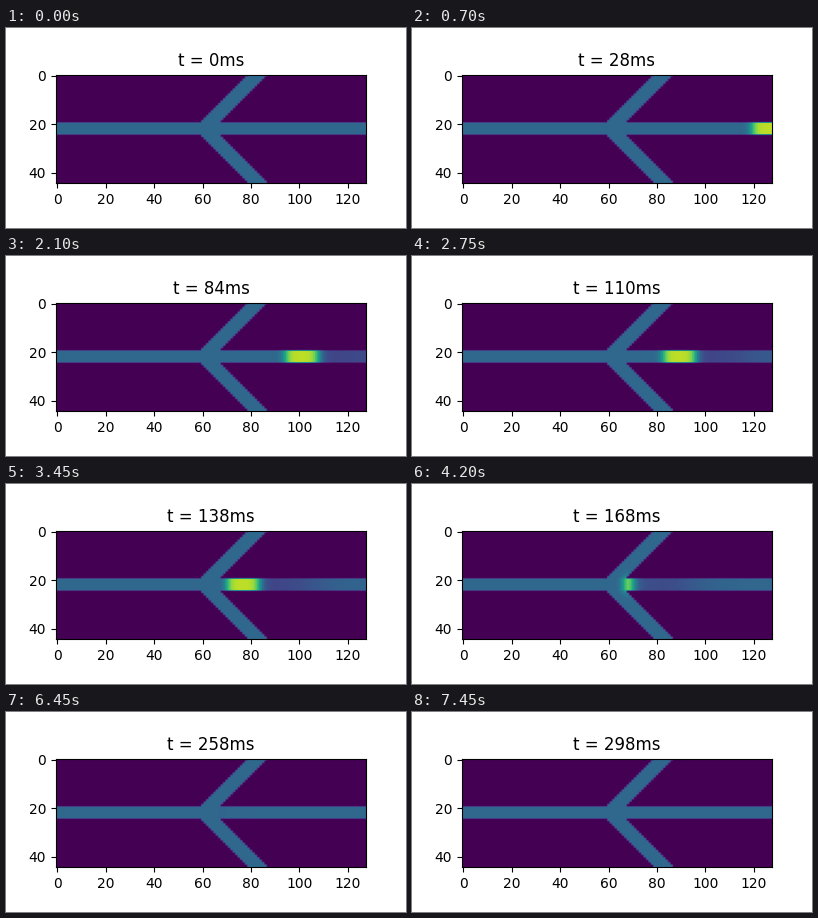
Recreate the animation shown at these times as a matplotlib script. Size 400x200 px, loop 7.5 s.

```python
import numpy as np
import matplotlib.pyplot as plt
from matplotlib.animation import FuncAnimation

ROWS, COLS = 45, 128
FRAMES, STEP_MS = 150, 2
REST, PEAK, DIP = 0.333, 0.57, 0.135   # resting level, pulse height, refractory depth
SPEED = 0.447                          # columns per ms


def sigmoid(z):
    return 0.5 * (1 + np.tanh(z / 2))


row, col = np.mgrid[:ROWS, :COLS]
off = np.abs(row - ROWS // 2)          # distance from the centre line

# A straight channel with two diagonal branches
channel = off <= 2
start = 57 + off
branch = (off > 2) & (col >= start) & (col < start + 8)
tissue = channel | branch

# When the pulse reaches and leaves each cell
near = np.clip(70 - col, 0, None)
arrive = 52 + (108.6 - col) / SPEED + 0.3 * near ** 2
leave = arrive + 30 + 14 * np.exp((col - 127) / 6)

# The pulse dies out where the branches meet
reach = sigmoid((col - 66.5) / 0.9) * np.exp(-np.clip(off - 2, 0, None) / 1.2)
depth = DIP * reach * np.interp(col, [72, 88], [0.65, 1])


def potential(t):
    rise = sigmoid((t - arrive) / 2.2)
    fall = sigmoid((t - leave) / 2.4)
    recovering = sigmoid((leave + 50 - t) / 14)
    v = REST + PEAK * reach * rise * (1 - fall) - depth * fall * recovering
    return np.where(tissue, v, 0)


fig, ax = plt.subplots(figsize=(4, 2), dpi=100)
img = ax.imshow(potential(0), cmap="viridis", vmin=0, vmax=1)
title = ax.set_title("t = 0ms")


def update(i):
    t = i * STEP_MS
    img.set_data(potential(t))
    title.set_text(f"t = {t}ms")
    return img, title


anim = FuncAnimation(fig, update, frames=FRAMES, interval=50,
                     repeat=True, repeat_delay=0, blit=False)
plt.show()
```
